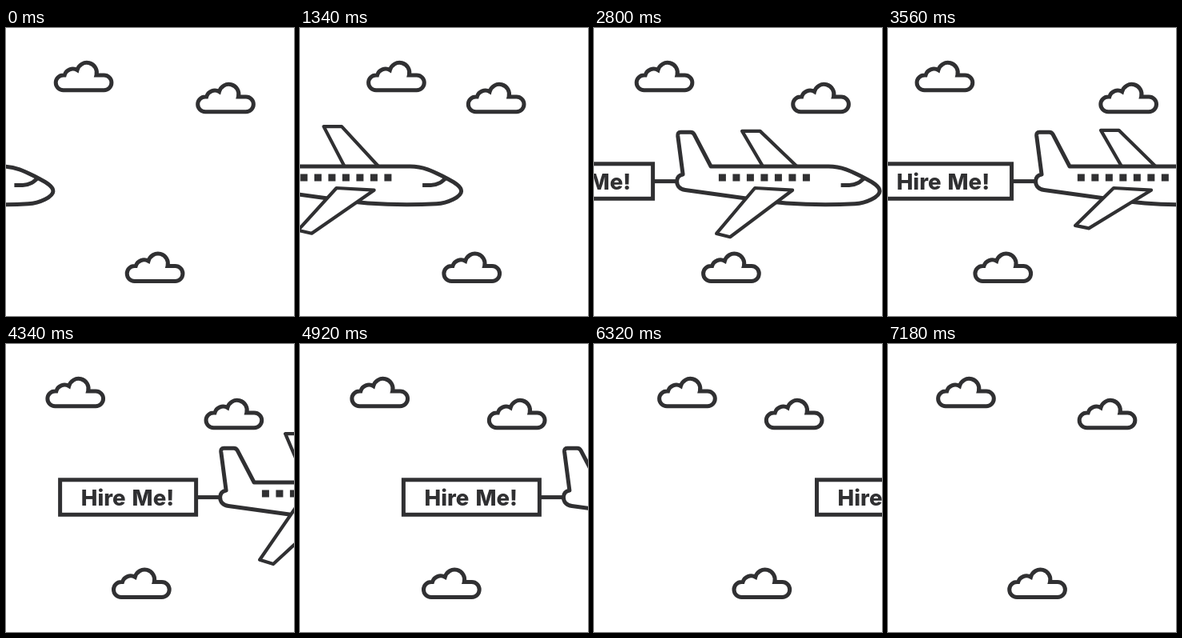
Recreate the animation shown at these times as an HTML page. Size 360x360 px, loop 7.2 s.

```html
<!DOCTYPE html>
<html lang="en">
<head>
<meta charset="utf-8">
<title>Banner plane</title>
<style>
  html, body { margin: 0; width: 100%; height: 100%; overflow: hidden; background: #fff; }
  svg { display: block; width: 100vw; height: 100vh; }
  .ink { fill: #fff; stroke: #303032; stroke-width: 5; }
  .round { stroke-linejoin: round; }
  .thin { stroke-width: 4.2; }
  .solid { fill: #303032; }
  text { font: 800 27.6px Inter, Roboto, sans-serif; word-spacing: 2px; text-anchor: middle; }
</style>
</head>
<body>
<svg viewBox="0 0 360 360">
  <defs>
    <path id="cloud" class="ink" d="M71.6 77.7H122.5A9.4 9.4 0 0 0 122.5 58.9H113A12.4 12.4 0 0 0 89 52.6
      A10.8 10.8 0 0 0 73.2 58.9H71.6A9.4 9.4 0 0 0 71.6 77.7Z"/>
  </defs>
  <use class="cloud" href="#cloud"/>
  <use class="cloud" href="#cloud"/>
  <use class="cloud" href="#cloud"/>
  <g id="plane">
    <path class="ink" d="M74 191.6H104"/>
    <rect class="ink" x="-96.5" y="169.8" width="170" height="43.5"/>
    <text class="solid" x="-12.2" y="202">Hire Me!</text>
    <path id="farWing" class="ink thin round"/>
    <path class="ink round" d="M111 183L104.7 135Q104.2 130.2 108.2 130.2H120.7Q123.7 130.2 125.2 133.2L146 173H293
      C312 173 325 181 337 187C346 192 357 197 357 204C357 211 340 219 326 219.7
      C300 221.3 262 220.6 240 219Q222 217.6 190 213L114 202.5
      C107 201.5 103.5 197 103.5 191.7C103.5 187 106 184 111 183Z"/>
    <path class="ink" style="fill:none" d="M308.5 196.5H319C328 196.5 333 192 338 187.5"/>
    <g id="windows" class="solid"></g>
    <path id="nearWing" class="ink thin round"/>
  </g>
</svg>
<script>
  const LOOP = 7200, SPEED = 0.1065, FLAP = 2400;
  const $ = id => document.getElementById(id);

  // x, y, swing during the first and third leg, swing during the second
  const drift = [
    [0, 0, 26.5, -27],
    [177.5, 27, -33.3, 27],
    [89, 238.7, 32.5, -43.7]
  ];
  const clouds = [...document.querySelectorAll('.cloud')];

  for (let i = 0; i < 7; i++) {
    const pane = document.createElementNS('http://www.w3.org/2000/svg', 'rect');
    const box = { x: 155.8 + 17.5 * i, y: 182.5, width: 9, height: 9 };
    for (const k in box) pane.setAttribute(k, box[k]);
    $('windows').append(pane);
  }

  function draw(t) {
    // Each swing lasts 2400 ms: out and straight back
    const swing = 1 - Math.abs(t % 2400 - 1200) / 1200;
    const leg = Math.floor(t / 2400) % 2;
    clouds.forEach((cloud, i) => {
      const [x, y, ...reach] = drift[i];
      cloud.setAttribute('transform', `translate(${x + reach[leg] * swing} ${y})`);
    });

    $('plane').setAttribute('transform', `translate(${SPEED * (t - 2800)} 0)`);

    const angle = peak => 2 * Math.PI * (t - peak) / FLAP;
    const far = 172 - (49.35 + 10.5 * Math.cos(angle(1958)));
    $('farWing').setAttribute('d', `M211 173L185 ${far}H207.5L253.5 173`);

    const a = angle(2147);
    const span = 62.6 + 14.6 * (Math.cos(a) + Math.cos(3 * a) / 9);
    $('nearWing').setAttribute('d',
      `M201 200L248 202.7L170 ${200 + span}L153 ${200 + span * 0.93}Z`);
  }

  const start = performance.now();
  function tick() {
    draw((performance.now() - start) % LOOP);
    requestAnimationFrame(tick);
  }
  tick();
</script>
</body>
</html>
```
